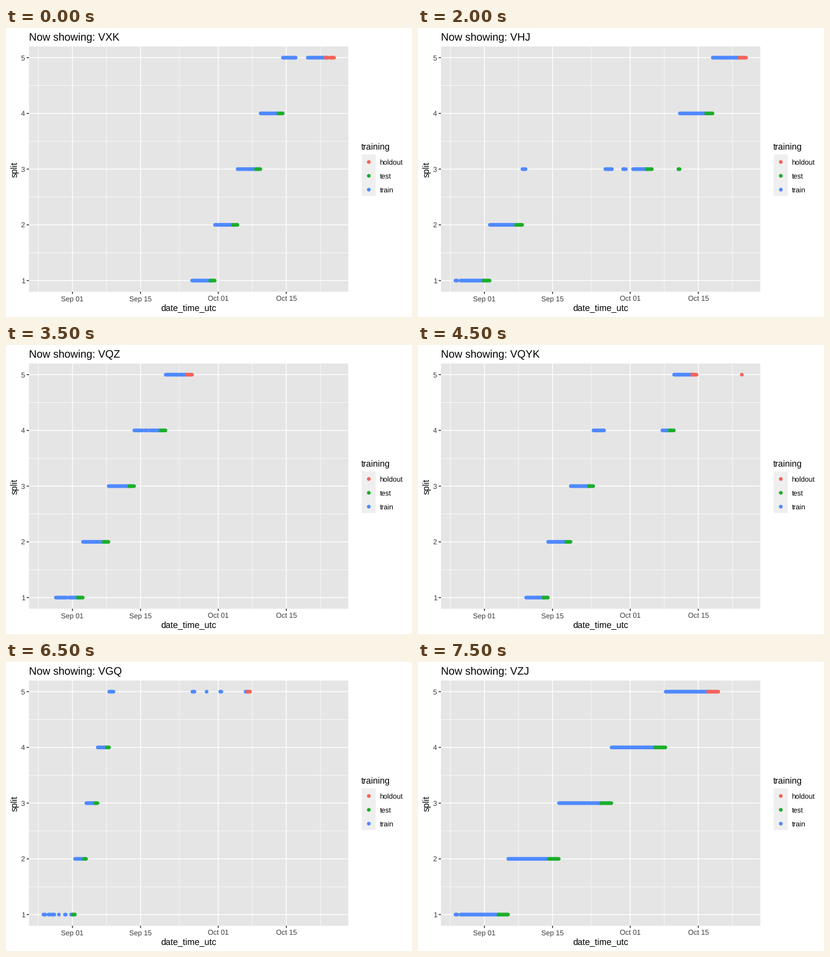
Animation of 672x480 px, one loop 8 s. Source, as a matplotlib script:

```python
import matplotlib.pyplot as plt
from matplotlib.animation import FuncAnimation
from matplotlib.collections import LineCollection
from matplotlib.patches import Rectangle

plt.rcParams["font.family"] = "Liberation Sans"
plt.rcParams["text.hinting"] = "none"

W, H, DPI = 672, 480, 96
PT = 72 / DPI
RED, GREEN, BLUE = "#f5635a", "#1bae2c", "#4f89ff"
PANEL, KEY, GREY, TICK = "#e5e5e5", "#efefef", "#3c3c3c", "#262626"
LEFT, RIGHT, TOP, BOTTOM = 38, 566.6, 30.8, 438
DOT = 6.2
TEST_SHARE = 0.195

# Per series: spans with readings, then where splits 1 to 4 end
# (five equal parts if not given).
SERIES = [
    ([(308, 479.5), (499.5, 503), (505, 515), (517, 524), (527, 533), (536.5, 543)],
     [345.5, 383, 421, 458]),
    ([(62, 65), (70.5, 178), (308, 543)], [135, 334, 403.5, 472.5]),
    ([(62, 65), (70.5, 178), (310, 321), (339.5, 344), (356, 387), (431, 543)],
     [118.5, 172.5, 433, 487.5]),
    ([(340, 543)], []),
    ([(82.5, 100.5), (104, 226), (230, 234), (238, 308)],
     [127, 169.5, 212, 264]),
    ([(179, 308), (404.5, 461), (536, 536)], [215, 252.5, 290, 423.5]),
    ([(62, 65), (69.5, 178), (308, 402)], []),
    ([(62, 65), (70.5, 73), (76, 80), (87.5, 87.5), (97.5, 99), (107.5, 178),
      (308.5, 312), (332, 332), (354.5, 356.5), (396.5, 404)],
     [114, 132.5, 151.5, 170.5]),
    ([(62, 65), (70.5, 497)], [149, 233, 320, 409.5]),
]
TITLES = ["VXK", "VHYK", "VHJ", "VQZ", "VQYK", "VGX", "VGQ", "VZJ"]


def day_x(day):
    """Pixel x of a day counted from Sep 01."""
    return 110 + 8.045 * day


def row_y(split):
    return 419.5 - 92.55 * (split - 1)


def clip(spans, lo, hi):
    out = []
    for a, b in spans:
        x0, x1 = max(a, lo), min(b, hi)
        if x1 > x0 or (a == b and lo <= a <= hi):
            out.append((x0, max(x1, x0 + 0.1)))
    return out


def reach(spans, share):
    """Position by which a share of the covered length has passed."""
    left = share * sum(b - a for a, b in spans)
    for a, b in spans:
        if left <= b - a:
            return a + left
        left -= b - a
    return spans[-1][1]


def bars(spans, ends):
    """Segments and colours of the five splits of one series."""
    segs, colors = [], []
    ends = ends or [reach(spans, k / 5) for k in range(1, 5)]
    for split, (lo, hi) in enumerate(zip([0, *ends], [*ends, W]), 1):
        row = clip(spans, lo + 0.4, hi)
        cut = reach(row, 1 - TEST_SHARE)
        last = RED if split == 5 else GREEN
        y = row_y(split)
        for part, color in ((clip(row, 0, cut), BLUE), (clip(row, cut, W), last)):
            segs += [[(x0, y), (x1, y)] for x0, x1 in part]
            colors += [color] * len(part)
    return segs, colors


fig = plt.figure(figsize=(W / DPI, H / DPI), dpi=DPI, facecolor="white")
ax = fig.add_axes([0, 0, 1, 1])
ax.set(xlim=(0, W), ylim=(H, 0))
ax.axis("off")


def lines(segs, color, width, z):
    ax.add_collection(LineCollection(segs, colors=color, linewidths=width * PT,
                                     zorder=z, snap=False), autolim=False)


def box(x, y, w, h, color):
    ax.add_patch(Rectangle((x, y), w, h, fc=color, lw=0, zorder=0, snap=False))


def label(x, y, s, size=8.8, color="black", **kw):
    return ax.text(x, y, s, fontsize=size, color=color, va="baseline", **kw)


def vert(xs, y0, y1):
    return [[(x, y0), (x, y1)] for x in xs]


def horiz(ys, x0, x1):
    return [[(x0, y), (x1, y)] for y in ys]


# Panel and grid
box(LEFT, TOP, RIGHT - LEFT, BOTTOM - TOP, PANEL)
days = {"Sep 01": 0, "Sep 15": 14, "Oct 01": 30, "Oct 15": 44}
xs = [day_x(d) for d in days.values()]
ys = [row_y(s) for s in range(1, 6)]
minor_x = [day_x(d) for d in (-7, 7, 22, 37, 51)]
minor_y = [row_y(s + 0.5) for s in range(1, 5)]
lines(vert(minor_x, TOP, BOTTOM) + horiz(minor_y, LEFT, RIGHT), "white", 0.71, 1)
lines(vert(xs, TOP, BOTTOM) + horiz(ys, LEFT, RIGHT), "white", 1.42, 2)

# Axes
lines(vert(xs, BOTTOM, BOTTOM + 3.7) + horiz(ys, LEFT - 3.7, LEFT), TICK, 1.42, 2)
for name, x in zip(days, xs):
    label(x, 453.2, name, color=GREY, ha="center")
for split, y in enumerate(ys, 1):
    label(31.3, y + 4.2, str(split), color=GREY, ha="right")
label(302.2, 470, "date_time_utc", 11, ha="center")
label(18, 234.6, "split", 11, ha="center", rotation=90, rotation_mode="anchor")

# Legend
label(588.2, 202, "training", 11)
box(588.8, 210, 23.04, 69.12, KEY)
for i, (name, color) in enumerate([("holdout", RED), ("test", GREEN), ("train", BLUE)]):
    y = 222 + 23.04 * i
    ax.plot(600.2, y, "o", ms=DOT * PT, mew=0, color=color, snap=False)
    label(618.6, y + 4.6, name)

title = label(37.8, 20, "", 13.2)
data = LineCollection([], linewidths=DOT * PT, capstyle="round", zorder=3, snap=False)
ax.add_collection(data, autolim=False)


def update(step):
    # The data switches half a beat ahead of the title.
    segs, colors = bars(*SERIES[(step + 1) // 2])
    data.set_segments(segs)
    data.set_color(colors)
    title.set_text("Now showing: " + TITLES[step // 2])
    return data, title


anim = FuncAnimation(fig, update, frames=16, interval=500, repeat=True, repeat_delay=0)
plt.show()
```
